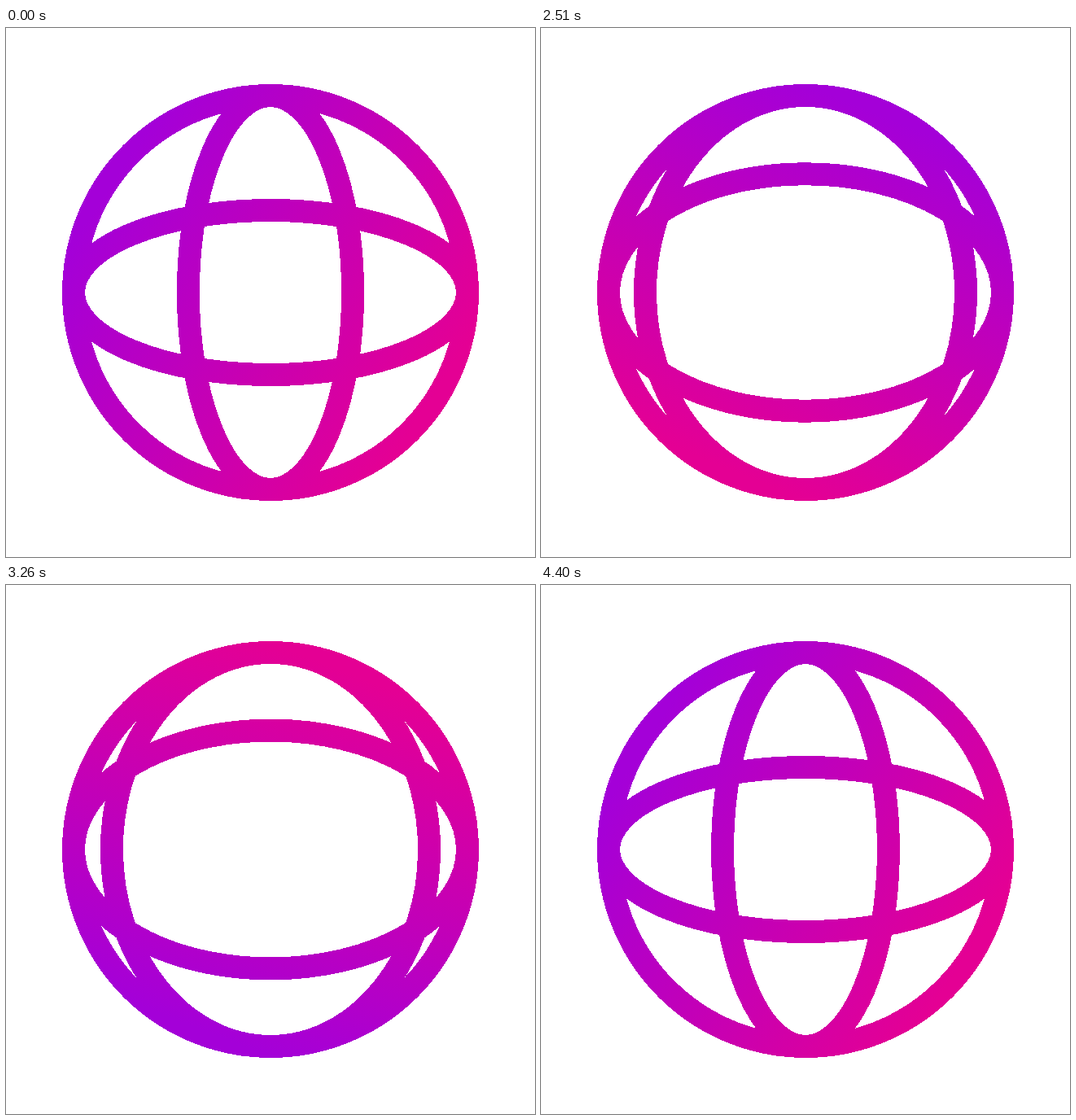
An HTML page that plays this animation: 650 px wide and 650 px high, repeating every 4.43 s.

```html
<!DOCTYPE html>
<html lang="en">
<head>
<meta charset="utf-8">
<title>Spinning globe</title>
<style>
  html, body { margin: 0; width: 100%; height: 100%; overflow: hidden; background: #fff; }
  svg { display: block; width: 100vw; height: 100vh; }
</style>
</head>
<body>
<svg viewBox="0 0 650 650">
  <defs>
    <linearGradient id="tint" gradientUnits="userSpaceOnUse" x1="562" y1="325" x2="88" y2="325">
      <stop offset="0" stop-color="#a400d8"/>
      <stop offset="1" stop-color="#e40094"/>
    </linearGradient>
  </defs>
  <g fill="none" stroke="url(#tint)" stroke-width="28" shape-rendering="crispEdges">
    <circle cx="325" cy="325" r="242"/>
    <ellipse id="meridian" cx="325" cy="325" rx="101" ry="242"/>
    <ellipse id="parallel" cx="325" cy="325" rx="242" ry="101"/>
  </g>
</svg>
<script>
  const LOOP = 4430, START = 2030, STEP = 30, REST = 2000;
  const RADIUS = 242, MERIDIAN_ANGLE = 24.7, TINT_ANGLE = -147;

  // Each key: time in ms, value, slope per ms
  const spin = [
    [2000, 0, 0], [2030, 0.5, 0.03], [2510, 79.2, 0.238], [2990, 195.4, 0.245],
    [3260, 258.4, 0.2], [3920, 341.7, 0.075], [4400, 359.8, 0.008], [4430, 360, 0]
  ];
  const tilt = [
    [2000, 101, 0], [2030, 101.4, 0.02], [2510, 145.7, 0.045], [2990, 153, -0.01],
    [3260, 146.4, -0.045], [3920, 104, -0.018], [4400, 101, 0], [4430, 101, 0]
  ];

  const tint = document.getElementById('tint');
  const meridian = document.getElementById('meridian');
  const parallel = document.getElementById('parallel');

  // Cubic Hermite interpolation
  function sample(keys, t) {
    let i = 0;
    while (i < keys.length - 2 && t >= keys[i + 1][0]) i++;
    const [t0, a, sa] = keys[i], [t1, b, sb] = keys[i + 1];
    const h = t1 - t0, u = (t - t0) / h, v = 1 - u;
    return a + (b - a) * u * u * (3 - 2 * u) + h * u * v * (sa * v - sb * u);
  }

  function draw(time) {
    const t = time < START ? REST : START + Math.floor((time - START) / STEP) * STEP;
    const turn = sample(spin, t);
    const angle = (MERIDIAN_ANGLE - turn) * Math.PI / 180;
    meridian.setAttribute('rx', Math.max(0.5, RADIUS * Math.abs(Math.sin(angle))));
    parallel.setAttribute('ry', sample(tilt, t));
    tint.setAttribute('gradientTransform', `rotate(${TINT_ANGLE + turn} 325 325)`);
  }

  const begin = performance.now();
  function tick() {
    draw((performance.now() - begin) % LOOP);
    requestAnimationFrame(tick);
  }
  tick();
</script>
</body>
</html>
```
